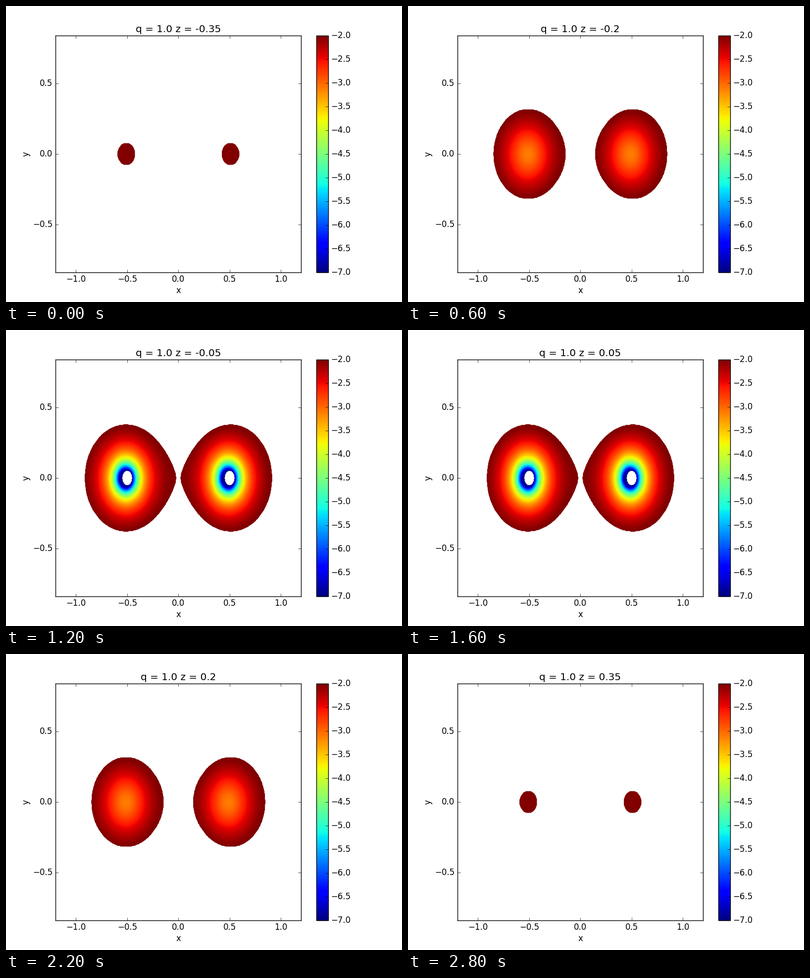
Write a matplotlib script that moves like this. It is 800 px wide and 600 px high and loops after 3000 ms.

```python
import matplotlib.pyplot as plt
import numpy as np
from matplotlib.animation import FuncAnimation

plt.rcParams.update({
    "font.family": "DejaVu Sans",
    "font.size": 12,
    "text.hinting": "auto",
    "text.hinting_factor": 8,
    "text.kerning_factor": 6,
    "axes.linewidth": 1.0,
    "axes.titlesize": 14.4,
    "axes.titlepad": 5,
    "axes.labelpad": 3.4,
    "axes.axisbelow": False,
    "xtick.direction": "in",
    "ytick.direction": "in",
    "xtick.top": True,
    "ytick.right": True,
    "ytick.alignment": "center",
    "xtick.major.size": 4,
    "ytick.major.size": 4,
    "xtick.major.width": 0.5,
    "ytick.major.width": 0.5,
    "xtick.major.pad": 3.5,
    "ytick.major.pad": 4,
})

Q = 1.0
LOW, HIGH = -7.0, -2.0
STEP = 0.005
SLICES = 15

# x varies slowest, so points further right are painted on top
X, Y = np.meshgrid(np.arange(-200, 201) * STEP,
                   np.arange(-140, 141) * STEP, indexing="ij")


def potential(z):
    """Roche potential of a binary with mass ratio Q in the plane at height z."""
    m1, m2 = Q / (1 + Q), 1 / (1 + Q)
    r1 = np.sqrt((X + m2) ** 2 + Y ** 2 + z ** 2)
    r2 = np.sqrt((X - m1) ** 2 + Y ** 2 + z ** 2)
    with np.errstate(divide="ignore"):
        return -m1 / r1 - m2 / r2 - 0.5 * (X ** 2 + Y ** 2)


fig = plt.figure(figsize=(8, 6), dpi=100, facecolor="white")
ax = fig.add_axes([0.125, 0.1, 0.62, 0.8])
ax.set_xlim(-1.2, 1.197)
ax.set_ylim(-0.84, 0.84)
ax.set_xticks([-1, -0.5, 0, 0.5, 1])
ax.set_yticks([-0.5, 0, 0.5])
ax.set_xlabel("x")
ax.set_ylabel("y")
title = ax.set_title("")

dots = ax.scatter([0], [0], c=[HIGH], s=20, marker="o", cmap="jet",
                  vmin=LOW, vmax=HIGH, linewidths=0, edgecolors="none")

cax = fig.add_axes([627 / 800, 0.1, 24 / 800, 0.8])
bar = fig.colorbar(dots, cax=cax, ticks=np.arange(LOW, HIGH + 0.1, 0.5))
bar.ax.tick_params(left=False, right=True, length=4, width=0.5)
bar.outline.set_linewidth(1.0)


def update(i):
    z = (i - SLICES // 2) / 20
    phi = potential(z)
    lobe = (phi >= LOW) & (phi <= HIGH)
    dots.set_offsets(np.column_stack([X[lobe], Y[lobe]]))
    dots.set_array(phi[lobe])
    title.set_text(f"q = {Q} z = {z}")
    return dots, title


anim = FuncAnimation(fig, update, frames=SLICES, interval=200,
                     repeat=True, repeat_delay=0, blit=False)

plt.show()
```
